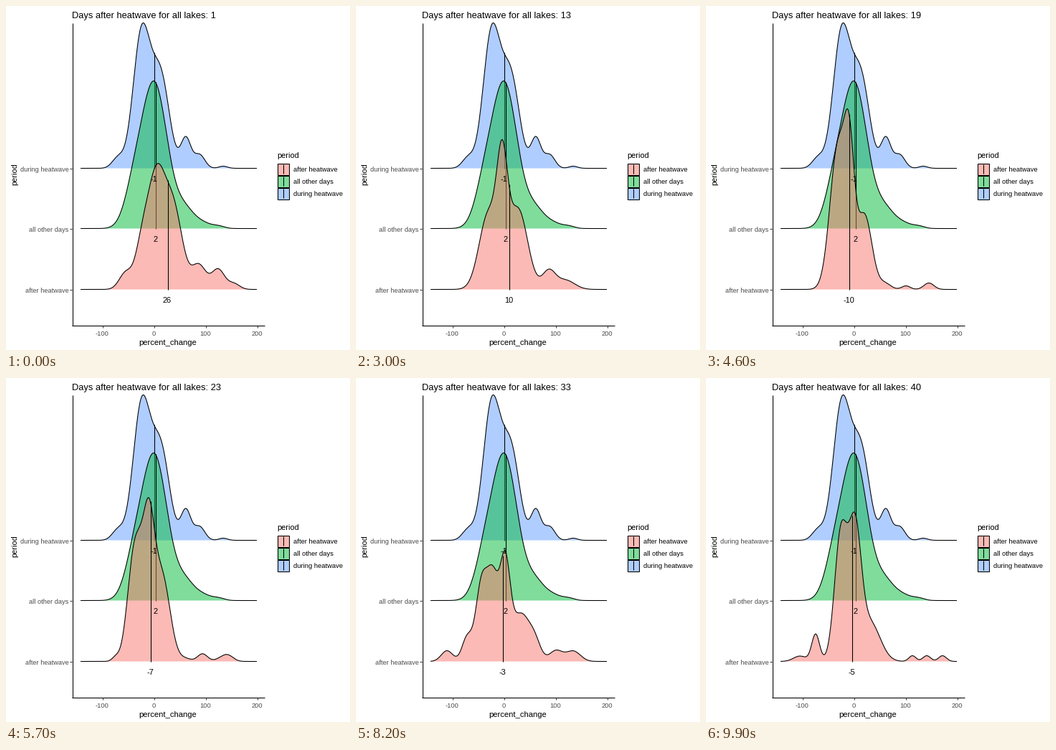
A matplotlib script for the animation above (10 s loop, 480 by 480 pixels).

```python
import numpy as np
import matplotlib.pyplot as plt
from matplotlib.animation import FuncAnimation
from matplotlib.patches import Polygon, Rectangle

plt.rcParams["font.family"] = "Liberation Sans"

FRAMES, DAYS = 100, 40
RED, GREEN, BLUE = "#F8766D", "#00BA38", "#619CFF"
GREY = "#4D4D4D"
PT = 0.75  # points per pixel at 96 dpi
GRID = np.linspace(104, 350, 493)


def density(*bumps):
    """Sum of normal bumps, each (centre, height, spread) in pixels."""
    return sum(h * np.exp(-((GRID - c) / s) ** 2 / 2) for c, h, s in bumps)


during = density((156, 14, 8), (189.5, 190, 12), (216, 125, 12), (251, 42, 7),
                 (270, 19, 7.5), (303, 3, 6))
other = density((178, 42, 13), (207, 202, 18), (250, 24, 13), (275, 7, 12), (297, 3, 8))

# Poses of the moving ridge: (step, centre value, density)
poses = [
    (0, 25.6, density((167, 23, 9), (189, 45, 9), (210, 160, 13), (235, 100, 12),
                      (269, 34, 10), (296, 28, 9), (318, 8, 8))),
    (16, 17.6, density((152, 11, 9), (183, 64, 13), (207, 132, 8.5), (224, 115, 10),
                       (249, 64, 7.5), (270, 40, 10), (303, 14, 13))),
    (30, 9.6, density((185, 106, 13), (204, 143, 7.5), (226, 112, 13.5), (269, 25, 9),
                      (292, 13, 13))),
    (46, -9.6, density((184, 198, 11), (200, 160, 7), (221, 104, 10.5), (250, 8, 8),
                       (279, 5, 6), (311, 9, 7))),
    (68, -5, density((153, 11, 5), (176, 124, 8.5), (199, 178, 11.5), (217, 106, 11),
                     (273, 18, 6.5), (304, 12.5, 9))),
    (82, -3.4, density((127, 15, 8), (155, 33, 7), (175, 105, 8), (191, 112, 8),
                       (208, 127, 7), (230, 66, 13), (250, 20, 8), (279, 15, 9),
                       (303, 14.5, 10))),
    (99, -5, density((131, 7.5, 9), (153, 38, 5.5), (188.5, 180, 9), (208, 172, 8.5),
                     (229, 54, 14), (288, 8, 5), (308, 8, 5.5), (330, 8, 5.5))),
]
steps, values, shapes = zip(*poses)

fig = plt.figure(figsize=(5, 5), dpi=96, facecolor="white")
ax = fig.add_axes([0, 0, 1, 1])
ax.set(xlim=(0, 480), ylim=(480, 0))
ax.axis("off")


def to_px(v):
    return 206.6 + 0.72 * v


def line(x, y, color="black", z=5):
    return ax.plot(x, y, color=color, lw=1.07 * PT, solid_capstyle="butt", zorder=z)[0]


def label(x, y, s, size, color="black", **kw):
    kw = {"va": "baseline", "ha": "left", "zorder": 20, **kw}
    return ax.text(x, y, s, fontsize=size * PT, color=color, **kw)


class Ridge:
    def __init__(self, base, color, z):
        self.base = base + 0.5
        self.fill = ax.add_patch(Polygon([(0, 0)] * 3, fc=color, alpha=0.5, lw=0, zorder=z))
        self.top = line([], [], z=z + 0.1)
        self.mid = line([], [], z=z + 0.2)
        self.text = label(0, base + 19, "", 11, ha="center")

    def show(self, h, value):
        x, y = to_px(value), self.base - h
        self.fill.set_xy([(GRID[0], self.base), *zip(GRID, y), (GRID[-1], self.base)])
        self.top.set_data(GRID, y)
        mid = int(x) + 0.5
        self.mid.set_data([mid, mid], [self.base, np.interp(x, GRID, y)])
        self.text.set_x(x)
        self.text.set_text(str(round(float(value))))


ridges = [Ridge(226, BLUE, 6), Ridge(310, GREEN, 7), Ridge(395, RED, 8)]
ridges[0].show(during, -0.6)
ridges[1].show(other, 2)

# Axes
line([92.5, 92.5], [24, 446])
line([92, 361], [445.5, 445.5])
for v in (-100, 0, 100, 200):
    x = to_px(v)
    line([x, x], [446, 449], "#333333")
    label(x - 0.3, 459.5, str(v), 9.2, GREY, ha="center")
names = ["after heatwave", "all other days", "during heatwave"]
for y, name in zip((395, 310, 226), names):
    line([89, 92], [y + 0.5] * 2, "#333333")
    label(87.5, y + 5, name, 9.3, GREY, ha="right")
label(226, 473, "percent_change", 11.3, ha="center")
label(12, 235, "period", 11, ha="center", va="center", rotation=90)
title = label(92, 17, "", 12.9)

# Legend
label(378, 212, "period", 11)
for i, (name, color) in enumerate(zip(names, (RED, GREEN, BLUE))):
    y = 219 + 17 * i
    box = (378.5, y + 0.5), 16, 16
    ax.add_patch(Rectangle(*box, fc=color, alpha=0.5, lw=0, zorder=4))
    ax.add_patch(Rectangle(*box, fill=False, ec="black", lw=1.07 * PT, zorder=5))
    line([386.5, 386.5], [y + 2, y + 15])
    label(400.6, y + 12, name, 9.4)


def update(i):
    k = min(np.searchsorted(steps, i, "right"), len(steps) - 1)
    t = (i - steps[k - 1]) / (steps[k] - steps[k - 1])
    ridges[2].show((1 - t) * shapes[k - 1] + t * shapes[k], np.interp(i, steps, values))
    day = round(1 + (DAYS - 1) * i / (FRAMES - 1))
    title.set_text(f"Days after heatwave for all lakes: {day}")
    return []


anim = FuncAnimation(fig, update, frames=FRAMES, interval=100, repeat=True,
                     repeat_delay=0, init_func=lambda: update(0))
plt.show()
```
